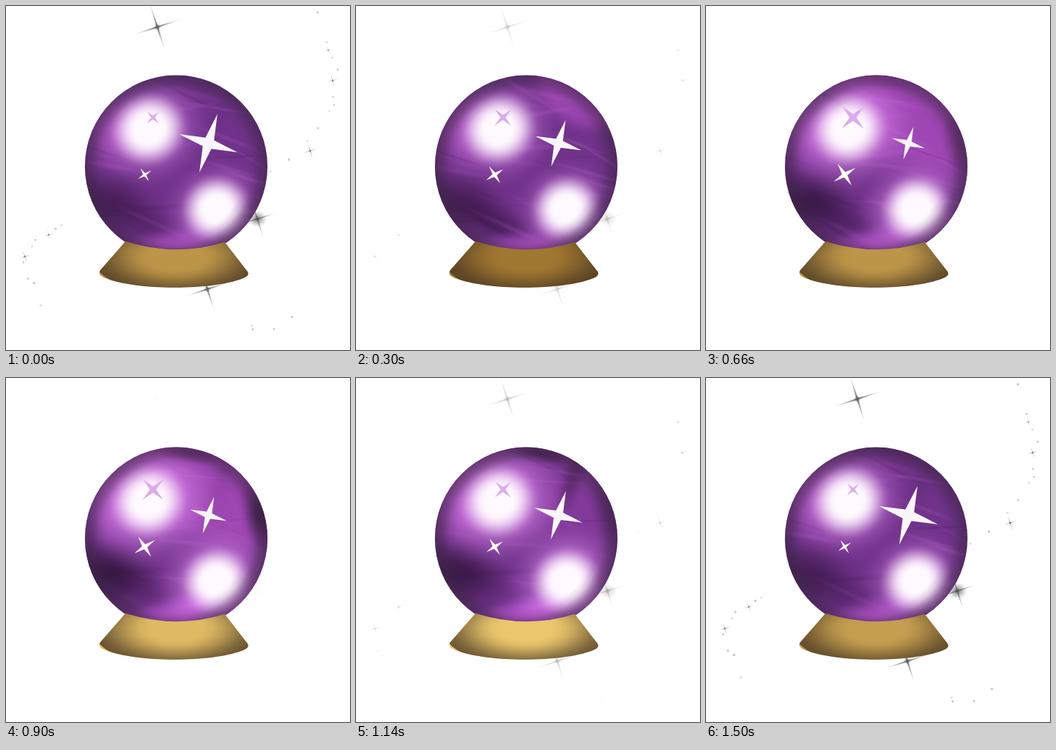
Animation of 475 by 475 pixels, one loop 1560 ms. Source, as an HTML page with a canvas:

```html
<!DOCTYPE html>
<html lang="en">
<head>
<meta charset="utf-8">
<title>Crystal ball</title>
<style>
html, body { margin: 0; width: 100%; height: 100%; overflow: hidden; background: #fff; }
canvas { display: block; width: 475px; height: 475px; }
</style>
</head>
<body>
<canvas id="stage" width="475" height="475"></canvas>
<script>
const ctx = document.getElementById('stage').getContext('2d');
const LOOP = 1560, STEP = 60, TAU = Math.PI * 2;
const ORB = { x: 235, y: 221.5, r: 126 };

const wave = (t, peak) => Math.cos(TAU * (t - peak) / LOOP);
const pulse = (t, peak) => .5 + .5 * wave(t, peak);
const clamp = v => Math.max(0, Math.min(1, v));
const smooth = (a, b, v) => { const k = clamp((v - a) / (b - a)); return k * k * (3 - 2 * k); };

function seeded(seed) {
  return () => (seed = (seed * 16807) % 2147483647) / 2147483647;
}

// Soft elliptical spot; alpha falls from the centre by the given curve
function glow(x, y, rx, ry, angle, rgb, curve) {
  const gradient = ctx.createRadialGradient(0, 0, 0, 0, 0, 1);
  for (let i = 0; i <= 12; i++) {
    gradient.addColorStop(i / 12, `rgba(${rgb},${clamp(curve(i / 12))})`);
  }
  ctx.save();
  ctx.translate(x, y);
  ctx.rotate(angle);
  ctx.scale(rx, ry);
  ctx.fillStyle = gradient;
  ctx.beginPath();
  ctx.arc(0, 0, 1, 0, TAU);
  ctx.fill();
  ctx.restore();
}

function haze(x, y, rx, ry, angle, rgb, alpha) {
  glow(x, y, rx, ry, angle, rgb, d => alpha * (1 - smooth(0, 1, d)));
}

function star(x, y, size, inner, angle, fill) {
  ctx.save();
  ctx.translate(x, y);
  ctx.rotate(angle);
  ctx.beginPath();
  for (let i = 0; i < 8; i++) {
    const r = i % 2 ? size * inner : size, a = i * TAU / 8;
    ctx.lineTo(r * Math.cos(a), r * Math.sin(a));
  }
  ctx.closePath();
  ctx.fillStyle = fill;
  ctx.fill();
  ctx.restore();
}

function sparkle(x, y, size) {
  const fill = ctx.createRadialGradient(0, 0, 0, 0, 0, size);
  fill.addColorStop(0, '#777');
  fill.addColorStop(.4, 'rgba(140,140,140,.65)');
  fill.addColorStop(1, 'rgba(170,170,170,0)');
  star(x, y, size, .05, -.31, fill);
  haze(x, y, size * .15, size * .15, 0, '70,70,70', .6);
}

// Dust scattered along a quadratic curve
function dustTrail(random, count, x0, y0, x1, y1, x2, y2) {
  for (let i = 0; i < count; i++) {
    const k = (i + random()) / count, m = 1 - k;
    const x = m * m * x0 + 2 * m * k * x1 + k * k * x2 + 16 * (random() - .5);
    const y = m * m * y0 + 2 * m * k * y1 + k * k * y2 + 16 * (random() - .5);
    haze(x, y, 2.6, 2.6, 0, '130,130,130', .3 + .35 * random());
  }
}

function drawSparkles(t) {
  const level = pulse(t, 1480) ** 2.3, random = seeded(52);
  ctx.globalAlpha = level;
  sparkle(209, 29, 37);
  sparkle(278, 391, 35);
  sparkle(347, 294, 30);
  haze(347, 294, 15, 13, 0, '80,80,80', .6);
  sparkle(420, 200, 14);
  sparkle(451, 103, 11);
  sparkle(26, 346, 11);
  sparkle(59, 316, 9);
  sparkle(445, 61, 8);
  ctx.globalAlpha = level * level;
  dustTrail(random, 11, 425, 12, 505, 140, 368, 230);
  dustTrail(random, 8, 95, 285, -20, 340, 58, 425);
  dustTrail(random, 4, 312, 422, 370, 470, 400, 435);
  ctx.globalAlpha = 1;
}

function drawWisps(t) {
  const random = seeded(417);
  for (let i = 0; i < 36; i++) {
    const x = 120 + random() * 230, y = 110 + random() * 215;
    const phase = random() * LOOP, length = 40 + random() * 55;
    haze(x + 14 * wave(t, phase), y + 7 * wave(t, phase + LOOP / 4), length,
      2 + random() * 5, random() * .8 - .25,
      i % 3 ? '196,105,218' : '50,18,64', .2 * pulse(t, phase));
  }
}

// A bright cloud spreads from the upper right, then dims
function drawClouds(t) {
  const spread = smooth(0, 740, t);
  const light = .78 * smooth(0, 260, t) * (1 - smooth(860, 1330, t));
  const r = 35 + 155 * spread;
  glow(325, 100, r * 1.05, r * .9, .35, '172,76,192', d => light * (1 - smooth(.6, 1, d)));

  const late = pulse(t, 930);
  haze(150, 165, 75, 85, .5, '190,88,208', .55 + .2 * late);
  haze(146, 270, 85, 52, .3, '42,18,52', .5 + .3 * late);
  haze(195, 300, 100, 32, .45, '42,16,55', .5 * pulse(t, 330));
  haze(270, 312, 120, 27, -.2, '204,98,230', .2 + .6 * pulse(t, 1060));
  haze(250, 104, 65, 16, .15, '55,25,68', .75 * pulse(t, 1080) ** 3);
  haze(352, 190, 30, 65, -.2, '48,24,58', .8 * pulse(t, 900) ** 3);
  haze(298, 140, 20, 70, .3, '66,28,80', .55 * pulse(t, 1220) ** 4);
  drawWisps(t);
}

function drawHighlight(x, y, size, core, halo) {
  haze(x, y, size, size * .94, -.5, '222,135,240', halo);
  glow(x, y, core, core * .94, -.5, '255,250,255', d => 1 - smooth(.3, 1, d));
}

function drawOrb(t) {
  const { x, y, r } = ORB, late = pulse(t, 960);
  ctx.save();
  ctx.beginPath();
  ctx.arc(x, y, r, 0, TAU);
  ctx.clip();
  ctx.fillStyle = '#70328a';
  ctx.fillRect(x - r, y - r, r * 2, r * 2);
  drawClouds(t);
  haze(235, 331, 90, 22, 0, '196,92,216', .65);
  drawHighlight(197, 170, 88 + 18 * late, 59, .8 + .2 * late);
  drawHighlight(290, 280, 78 + 14 * late, 54, .75 + .2 * late);
  glow(x, y, r + 1, r + 1, 0, '52,34,58', d => .55 * smooth(.77, 1, d));
  ctx.restore();
}

function drawBase(t) {
  const k = pulse(t, 1110);
  const mix = (a, b) => Math.round(a + (b - a) * k);
  ctx.save();
  ctx.beginPath();
  ctx.moveTo(165, 325);
  ctx.quadraticCurveTo(235, 347, 302, 326);
  ctx.lineTo(333, 366);
  ctx.quadraticCurveTo(338, 372, 326, 376.5);
  ctx.bezierCurveTo(283, 393, 180, 393, 136, 375.5);
  ctx.quadraticCurveTo(126, 371, 130, 365);
  ctx.closePath();
  ctx.clip();
  ctx.fillStyle = `rgb(${mix(160, 234)},${mix(119, 199)},${mix(49, 109)})`;
  ctx.fillRect(120, 315, 225, 80);
  glow(235, 346, 116, 52, 0, '65,48,32', d => .75 * smooth(.3, 1.05, d));
  ctx.restore();
}

function drawStars(t) {
  const swing = wave(t, 1480);
  star(279.5, 189.5, 33 + 9.5 * swing, .21, .3, '#f9f5fa');
  star(203, 154, 16.5 - 5 * swing, .22, .8, '#dcabec');
  star(191.5, 233, 14.2 - 3.6 * swing, .22, 1, '#fff');
}

function render(now) {
  const t = Math.floor((now % LOOP) / STEP) * STEP;
  ctx.fillStyle = '#fff';
  ctx.fillRect(0, 0, 475, 475);
  drawSparkles(t);
  drawOrb(t);
  drawBase(t);
  drawStars(t);
}

let start;
function tick(now) {
  start ??= now;
  render(now - start);
  requestAnimationFrame(tick);
}
render(0);
requestAnimationFrame(tick);
</script>
</body>
</html>
```
